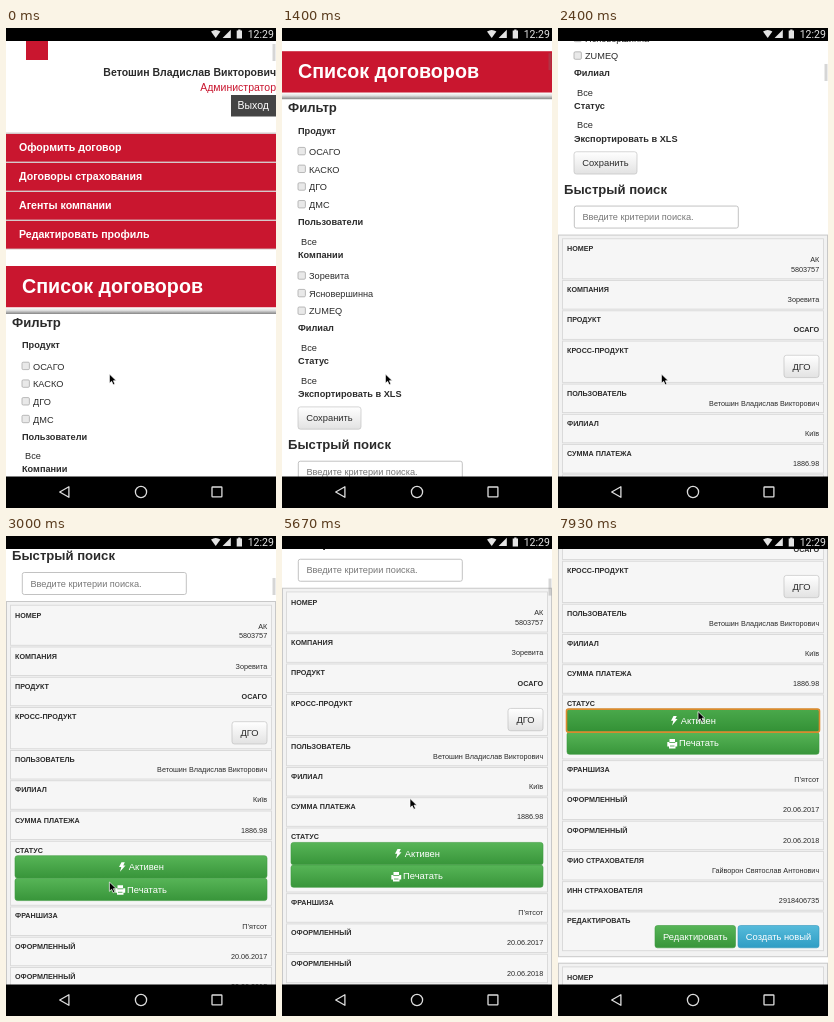
Write an HTML page that moves like this. It is 270 px wide and 480 px high and loops after 8000 ms.

```html
<!DOCTYPE html>
<html lang="ru">
<head>
<meta charset="utf-8">
<title>Список договоров</title>
<style>
html, body { margin: 0; height: 100%; overflow: hidden; background: #fff; }
svg { display: block; width: 100vw; height: 100vh; }
text { font-family: "Liberation Sans", Arial, sans-serif; white-space: pre; }
.clock { font-family: Roboto, sans-serif; }
.hover { opacity: 0; }
</style>
</head>
<body>
<svg id="stage" viewBox="0 0 270 480">
  <defs>
    <linearGradient id="green" x2="0" y2="1"><stop stop-color="#57b557"/><stop offset="1" stop-color="#38953a"/></linearGradient>
    <linearGradient id="blue" x2="0" y2="1"><stop stop-color="#56bbdb"/><stop offset="1" stop-color="#2f9dc4"/></linearGradient>
    <linearGradient id="grey" x2="0" y2="1"><stop stop-color="#fff"/><stop offset="1" stop-color="#e2e2e2"/></linearGradient>
    <linearGradient id="shade" x2="0" y2="1"><stop stop-color="#fff"/><stop offset=".45" stop-color="#ddd"/><stop offset="1" stop-color="#858585"/></linearGradient>
  </defs>
  <rect width="270" height="480" fill="#fff"/>
  <g id="page"></g>
  <rect id="bar" x="266.5" width="3" height="17" fill="#777" fill-opacity=".3"/>
  <path d="M0 0H270V13H0ZM0 448.4H270V480H0Z"/>
  <g fill="#e4e4e4">
    <path d="M205 3.6Q209.700 .4 214.400 3.6L209.700 10Z"/>
    <path d="M224.800 1.800V10H216.600Z"/>
    <path d="M230.700 2.600h1.500v-1h2.300v1h1.500V10.500H230.700Z"/>
    <text class="clock" x="241.700" y="10" font-size="10.500">12:29</text>
  </g>
  <g fill="none" stroke="#ddd" stroke-width="1.300">
    <path d="M62.900 458.700V469.300L53.700 464Z" stroke-linejoin="round"/>
    <circle cx="135" cy="464" r="5.600"/>
    <rect x="206" y="459" width="9.900" height="9.900" rx=".6"/>
  </g>
  <path id="cursor" d="M0 0V9.300L2.200 7.300L3.800 10.800L5.500 10L4 6.700H6.900Z" stroke="#fff" stroke-width=".7"/>
</svg>
<script>
const RED = '#c9162f', INK = '#2b2b2b';
const $ = id => document.getElementById(id);

const rect = (x, y, w, h, fill, more = '') =>
  `<rect x="${x}" y="${y}" width="${w}" height="${h}" fill="${fill}" ${more}/>`;
const text = (s, x, y, size, fill = INK, bold = false, anchor = 'start') =>
  `<text x="${x}" y="${y}" font-size="${size}" fill="${fill}" font-weight="${bold ? 700 : 400}" text-anchor="${anchor}">${s}</text>`;
const heading = (s, y) => text(s, 6, y, 13.1, INK, true);
const label = (s, y) => text(s, 16, y, 9.2, INK, true);
const choice = y => text('Все', 19, y, 9.2);
const check = (s, y) =>
  rect(16, y - 7.4, 7.4, 7.4, '#e9e9e9', 'rx="1.2" stroke="#aaa" stroke-width=".8"') + text(s, 27, y, 9.2);

function button(s, x, y, w, kind, shift = 0) {
  const edge = { grey: '#bbb', green: '#3f9a40', blue: '#3398be' }[kind];
  return rect(x, y, w, 22.3, `url(#${kind})`, `rx="2.5" stroke="${edge}" stroke-width=".6"`) +
    (shift ? rect(x, y, w, 22.3, '#27852b', 'rx="2.5" class="hover"') : '') +
    text(s, x + w / 2 + shift, y + 14.3, 9.35, kind === 'grey' ? INK : '#fff', false, 'middle');
}

function header() {
  const menu = ['Оформить договор', 'Договоры страхования', 'Агенты компании', 'Редактировать профиль'];
  return rect(20, 10, 22, 22, RED) +
    text('Ветошин Владислав Викторович', 270, 48, 10.5, INK, true, 'end') +
    text('Администратор', 270, 62.8, 10.5, RED, false, 'end') +
    rect(225, 67, 45, 21.5, '#444') + text('Выход', 231.5, 81.3, 10.5, '#fff') +
    rect(0, 104.5, 270, 117, '#d5c8ca') +
    menu.map((s, i) => rect(0, 106 + 29 * i, 270, 27.6, RED) +
      text(s, 13, 123.3 + 29 * i, 10.6, '#fff', true)).join('') +
    rect(0, 238, 270, 41.5, RED) + text('Список договоров', 16, 265.2, 19.7, '#fff', true) +
    rect(0, 279.5, 270, 6.5, 'url(#shade)');
}

function filters() {
  return heading('Фильтр', 299.2) + label('Продукт', 320.5) +
    ['ОСАГО', 'КАСКО', 'ДГО', 'ДМС'].map((s, i) => check(s, 341.6 + 17.7 * i)).join('') +
    label('Пользователи', 411.6) + choice(431.4) + label('Компании', 444.4) +
    ['Зоревита', 'Ясновершинна', 'ZUMEQ'].map((s, i) => check(s, 466 + 17.6 * i)).join('') +
    label('Филиал', 517.8) + choice(537.6) + label('Статус', 550.5) + choice(570.3) +
    label('Экспортировать в XLS', 583.8) + button('Сохранить', 16, 593.7, 63, 'grey') +
    heading('Быстрый поиск', 635.6) +
    rect(16.3, 648, 164, 22, '#fff', 'rx="2" stroke="#bbb" stroke-width=".9"') +
    text('Введите критерии поиска.', 24.4, 662.2, 9.2, '#777');
}

const bolt = y => `<path fill="#fff" d="M115.500 ${y + 6.500}h3.300l-1.500 3.200h2.200l-5.500 6.300l1.300-4.700h-2.300Z"/>`;
const printer = y => `<path fill="#fff" d="M111.500 ${y + 7}h5.500v3h2.200v4.500h-1.700v2h-6.500v-2h-1.700v-4.500h2.200Z"/>` +
  `<path stroke="#3f9c40" stroke-width=".8" fill="none" d="M111.300 ${y + 10.500}h6M112 ${y + 14}h4.500"/>`;

// One contract card; each row is [title, value, height].
function record(top, number) {
  const rows = [
    ['НОМЕР', number, 41.8], ['КОМПАНИЯ', 'Зоревита'], ['ПРОДУКТ', 'ОСАГО'],
    ['КРОСС-ПРОДУКТ', '', 43], ['ПОЛЬЗОВАТЕЛЬ', 'Ветошин Владислав Викторович'],
    ['ФИЛИАЛ', 'Київ'], ['СУММА ПЛАТЕЖА', '1886.98'], ['СТАТУС', '', 65.7],
    ['ФРАНШИЗА', 'П’ятсот'], ['ОФОРМЛЕННЫЙ', '20.06.2017'], ['ОФОРМЛЕННЫЙ', '20.06.2018'],
    ['ФИО СТРАХОВАТЕЛЯ', 'Гайворон Святослав Антонович'],
    ['ИНН СТРАХОВАТЕЛЯ', '2918406735'], ['РЕДАКТИРОВАТЬ', '', 40.5]
  ];
  let y = top + 3.7;
  let out = rect(.5, top, 269, 501.5, '#f2f2f2', 'stroke="#c8c8c8"');
  rows.forEach(([title, value, h = 30.25], i) => {
    out += rect(4.5, y, 261, h - 1.7, '#f6f6f6', 'stroke="#d8d8d8" stroke-width=".9"') +
      text(title, 9, y + (i ? 11.5 : 12.7), 7.2, INK, true);
    if (value) out += text(value, 261.2, y + h - 8.7, 7.25, INK, title === 'ПРОДУКТ', 'end');
    if (!i) out += text('АК', 261.2, y + 23.3, 7.25, INK, false, 'end');
    y += h;
  });
  return out + button('ДГО', 226, top + 120.2, 35, 'grey') +
    button('Активен', 9, top + 254.2, 252, 'green', 5.3) + bolt(top + 254.2) +
    button('Печатать', 9, top + 276.8, 252, 'green', 6) + printer(top + 276.8) +
    button('Редактировать', 97, top + 470.3, 80.5, 'green') +
    button('Создать новый', 180, top + 470.3, 81, 'blue');
}

$('page').innerHTML = header() + filters() + record(677, '5803757') + record(1185, '5803756') +
  rect(8.5, 930.9, 253, 23, 'none', 'id="focus" rx="2" stroke="#d98a2e" stroke-width="1.6"');
const [hoverActive, hoverPrint] = document.querySelectorAll('.hover');

// Keys: [time, value, linear?]; the segment ending at a key uses that key's easing.
function track(keys, t) {
  const i = keys.findIndex(k => k[0] > t);
  if (i < 0) return keys[keys.length - 1][1];
  if (!i) return keys[0][1];
  const [t0, v0] = keys[i - 1], [t1, v1, linear] = keys[i];
  const p = (t - t0) / (t1 - t0);
  return v0 + (v1 - v0) * (linear ? p : (1 - Math.cos(Math.PI * p)) / 2);
}

const scrollKeys = [[0, 0], [800, 120], [863, 120], [1730, 258.4], [1733, 258.4], [2600, 500], [2603, 500],
  [3000, 611.5], [5603, 611.5], [5670, 624.5, 1], [6130, 745.5, 1], [6270, 752], [6463, 752],
  [6900, 815], [7330, 757.8]];
const cursorX = [[4800, 103.4], [5330, 128], [7330, 128], [7530, 140]];
const cursorY = [[4800, 346], [5330, 262.5], [7330, 262.5], [7530, 175.5]];
const barKeys = [[3270, 1], [3650, 0], [5600, 0], [5660, 1], [7400, 1], [7800, 0]];
const printKeys = [[3270, 0], [3400, .25], [4870, .25], [5000, 0]];
const activeKeys = [[7460, 0], [7560, .25]];

function draw(now) {
  const t = now % 8000, y = track(scrollKeys, t);
  $('page').setAttribute('transform', `translate(0 ${-y})`);
  $('bar').setAttribute('y', 16 + y * .0425);
  $('bar').setAttribute('opacity', track(barKeys, t));
  $('cursor').setAttribute('transform', `translate(${track(cursorX, t)} ${track(cursorY, t)})`);
  hoverPrint.style.opacity = track(printKeys, t);
  hoverActive.style.opacity = track(activeKeys, t);
  $('focus').setAttribute('opacity', t >= 7670 ? 1 : 0);
  requestAnimationFrame(draw);
}
draw(performance.now());
</script>
</body>
</html>
```
